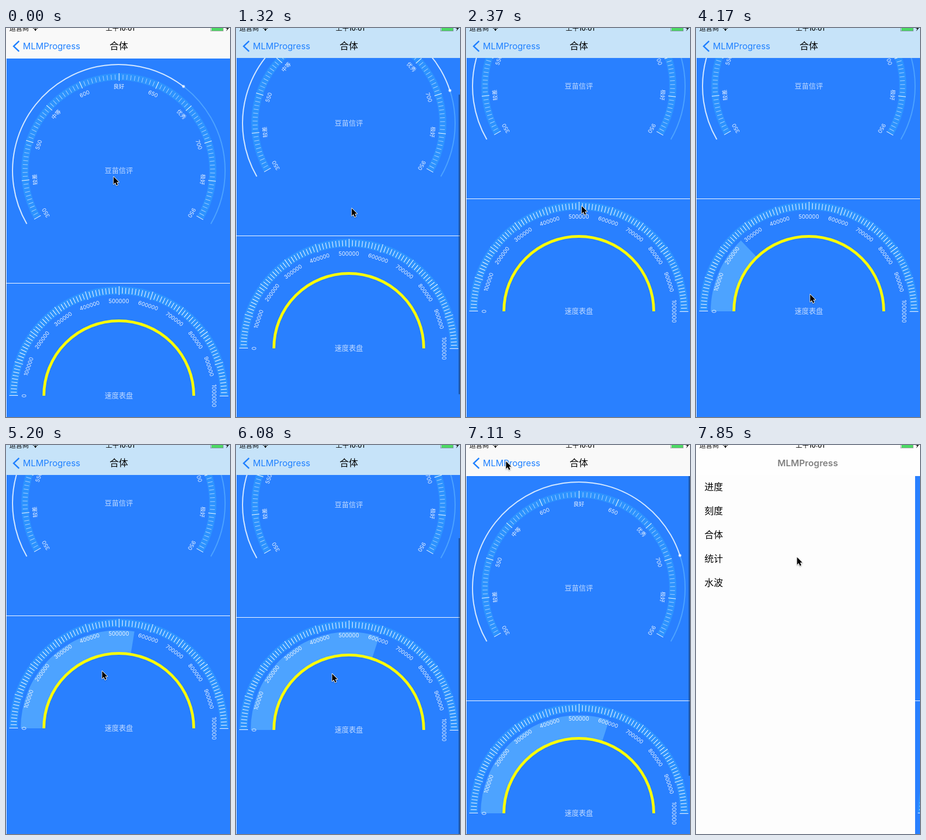
These frames come from a looping animation (411 by 714 pixels, 8000 ms). An HTML page with a canvas:

```html
<!DOCTYPE html>
<html lang="zh">
<head>
<meta charset="utf-8">
<style>
html, body { margin: 0; width: 100%; height: 100%; overflow: hidden; background: #fff; }
canvas { display: block; }
</style>
</head>
<body>
<canvas id="stage" width="411" height="714"></canvas>
<script>
const g = document.getElementById('stage').getContext('2d');
const W = 411, H = 714, LOOP = 8000, STEP = 148.2, CX = 207;
const FONT = 'Inter, "Noto Sans CJK SC", "Noto Sans CJK", sans-serif';
const BLUE = '#2980ff', TINT = '#1f80ff', PALE = '#4da3ff', BAND = '#2d93ff';
const rad = d => d * Math.PI / 180;
const clamp = v => Math.max(0, Math.min(1, v));
const mix = (a, b, k) => a + (b - a) * k;
const ease = (t, from, to) => {
  const k = clamp((t - from) / (to - from));
  return k * k * (3 - 2 * k);
};

// Fling up with friction, later dragged back just past the top.
const scrollAt = t =>
  155 * (1 - Math.exp(-Math.max(0, t - 1180) / 187)) - 156 * ease(t, 6010, 6800);
const shown = (t, from, to) => clamp((t - from) / 100) * clamp((to - t) / 150);

// Stops of the pointer: time, x, y.
const STOPS = [[0, 197, 273], [1180, 212, 418], [1334, 212, 331], [2371, 212, 327],
  [2900, 209, 489], [4200, 209, 489], [4450, 176, 415], [6010, 176, 415],
  [6600, 176, 557], [7050, 73, 30], [7480, 73, 30], [7855, 185, 206]];

function pointerAt(t) {
  let [, x, y] = STOPS[0];
  for (let i = 1; i < STOPS.length; i++) {
    const k = ease(t, STOPS[i - 1][0], STOPS[i][0]);
    x = mix(x, STOPS[i][1], k);
    y = mix(y, STOPS[i][2], k);
  }
  return [x, y];
}

function text(str, x, y, size, color, weight = 400, align = 'center') {
  g.font = `${weight} ${size}px ${FONT}`;
  g.textAlign = align;
  g.textBaseline = 'middle';
  g.fillStyle = color;
  g.fillText(str, x, y);
}

function arc(cy, r, from, to, width, color) {
  g.beginPath();
  g.arc(CX, cy, r, rad(from), rad(to));
  g.lineWidth = width;
  g.strokeStyle = color;
  g.stroke();
}

function path(points, close) {
  g.beginPath();
  points.forEach(([x, y]) => g.lineTo(x, y));
  if (close) g.closePath();
}

// Band with ten parts of ten ticks each, and a label on every long tick.
function dial(cy, from, to, outer, inner, minorColor, labelR, labels) {
  arc(cy, (outer + inner) / 2, from, to, outer - inner, BAND);
  for (let i = 0; i <= 100; i++) {
    const long = i % 10 === 0, inset = long ? 0 : 2.5;
    g.save();
    g.translate(CX, cy);
    g.rotate(rad(mix(from, to, i / 100) + 90));
    g.fillStyle = long ? '#fff' : minorColor;
    g.fillRect(0, inset - outer, 1, outer - inner + 1 - 2 * inset);
    if (long) text(labels[i / 10], 0, -labelR, 10, 'rgba(255,255,255,.9)');
    g.restore();
  }
}

function creditDial(t) {
  const cy = 262, end = 150 + Math.min(192, 157.5 + t * 0.0907);
  arc(cy, 195, 150, 390, 2, PALE);
  arc(cy, 195, 150, end, 2, '#d4e6ff');
  const x = CX + 195 * Math.cos(rad(end)), y = cy + 195 * Math.sin(rad(end));
  const glow = g.createRadialGradient(x, y, 1, x, y, 3.5);
  glow.addColorStop(0, '#fff');
  glow.addColorStop(1, 'rgba(255,255,255,0)');
  g.fillStyle = glow;
  g.fillRect(x - 4, y - 4, 8, 8);
  dial(cy, 150, 390, 179, 166, 'rgba(255,255,255,.6)', 154,
    ['350', '较差', '550', '中等', '600', '良好', '650', '优秀', '700', '极好', '950']);
  text('豆苗信评', CX, cy + 0.5, 13, '#c3dbff');
}

function speedDial(t) {
  const cy = 675, sweep = 108 * clamp((t - 3245) / 2115);
  if (sweep) arc(cy, 159, 180, 180 + sweep, 42, PALE);
  dial(cy, 180, 360, 201, 186, '#fff', 173.5,
    Array.from({ length: 11 }, (_, i) => String(i * 100000)));
  arc(cy, 137.5, 180, 360, 5, '#ff0');
  text('速度表盘', CX, cy + 0.5, 13, '#c3dbff');
}

function detail(t, x, scroll) {
  g.save();
  g.translate(x, 0);
  g.fillStyle = BLUE;
  g.fillRect(1, Math.max(55, 56 - scroll), W, H);
  g.translate(0, -scroll);
  creditDial(t);
  g.fillStyle = '#fff';
  g.fillRect(0, 468, W, 1);
  speedDial(t);
  g.translate(0, scroll);
  const top = 57 + 0.75 * Math.max(0, scroll);
  g.fillStyle = `rgba(0,0,0,${0.35 * (shown(t, 1180, 2350) + shown(t, 5950, 7300))})`;
  g.fillRect(408.5, top, 2.5, Math.min(H - top, 550));
  g.restore();
}

function list(p) {
  ['进度', '刻度', '合体', '统计', '水波'].forEach((name, i) =>
    text(name, 18.5 - 123 * (1 - p), 78 + 44 * i, 17, '#000', 400, 'left'));
  g.fillStyle = `rgba(0,0,0,${0.1 * (1 - p)})`;
  g.fillRect(0, 55, W, H);
}

function statusBar() {
  text('运营商', 6, 1, 12, '#000', 400, 'left');
  text('上午10:01', 209.5, 1, 12, '#000', 500);
  g.lineWidth = 1.6;
  g.strokeStyle = '#000';
  [3, 6].forEach(r => {
    g.beginPath();
    g.arc(54, 5, r, rad(225), rad(315));
    g.stroke();
  });
  g.fillStyle = '#000';
  g.fillRect(53, 3, 2, 2);
  g.lineWidth = 1;
  g.strokeStyle = 'rgba(0,0,0,.35)';
  g.strokeRect(375.5, -6.5, 23, 12);
  g.fillStyle = '#4cd964';
  g.fillRect(377, -5, 21, 10);
  g.fillStyle = '#000';
  path([[408, -4], [403, 1], [406, 1], [404, 6], [409, 0], [406, 0]], true);
  g.fill();
}

function navBar(t, p, scroll) {
  const k = clamp(scroll / 40), base = mix(249, 254, p);
  g.fillStyle = `rgb(${mix(base, 198, k)},${mix(base, 227, k)},${mix(base, 249, k)})`;
  g.fillRect(0, 0, W, 55);
  statusBar();
  const slide = 123 * p;
  g.globalAlpha = (t > 7400 ? 0.3 : 1) * (1 - p) ** 2;
  path([[24, 24], [14, 33.5], [24, 43]]);
  g.lineWidth = 2.5;
  g.strokeStyle = TINT;
  g.stroke();
  text('MLMProgress', 31 + slide, 34, 16, TINT, 400, 'left');
  g.globalAlpha = (1 - p) ** 2;
  text('合体', CX + slide, 34, 17, '#000', 500);
  g.globalAlpha = clamp((t - 7560) / 600);
  if (p) text('MLMProgress', 85 + slide, 34.5, 16.5, '#000', 600);
  g.globalAlpha = 1;
}

function pointer(x, y) {
  g.save();
  g.translate(x, y);
  g.scale(0.88, 0.88);
  path([[0.5, 0], [0.5, 15.5], [4, 12.2], [6.5, 18], [9.2, 16.8], [6.8, 11.2], [11.5, 11.2]], true);
  g.shadowColor = 'rgba(0,0,0,.35)';
  g.shadowBlur = 2;
  g.shadowOffsetY = 1;
  g.lineWidth = 2;
  g.lineJoin = 'round';
  g.strokeStyle = '#fff';
  g.stroke();
  g.shadowColor = 'transparent';
  g.fillStyle = '#000';
  g.fill();
  g.restore();
}

function draw(t) {
  const scroll = Math.round(scrollAt(t));
  const u = Math.max(0, t - 7550) * 0.0183;
  const p = 1 - (1 + u) * Math.exp(-u);
  g.fillStyle = '#fefefe';
  g.fillRect(0, 0, W, H);
  if (p) list(p);
  detail(t, Math.round(W * p), scroll);
  navBar(t, p, scroll);
  pointer(...pointerAt(t));
}

function frame(now) {
  draw(Math.floor((now % LOOP + 15) / STEP) * STEP);
  requestAnimationFrame(frame);
}
requestAnimationFrame(frame);
</script>
</body>
</html>
```
